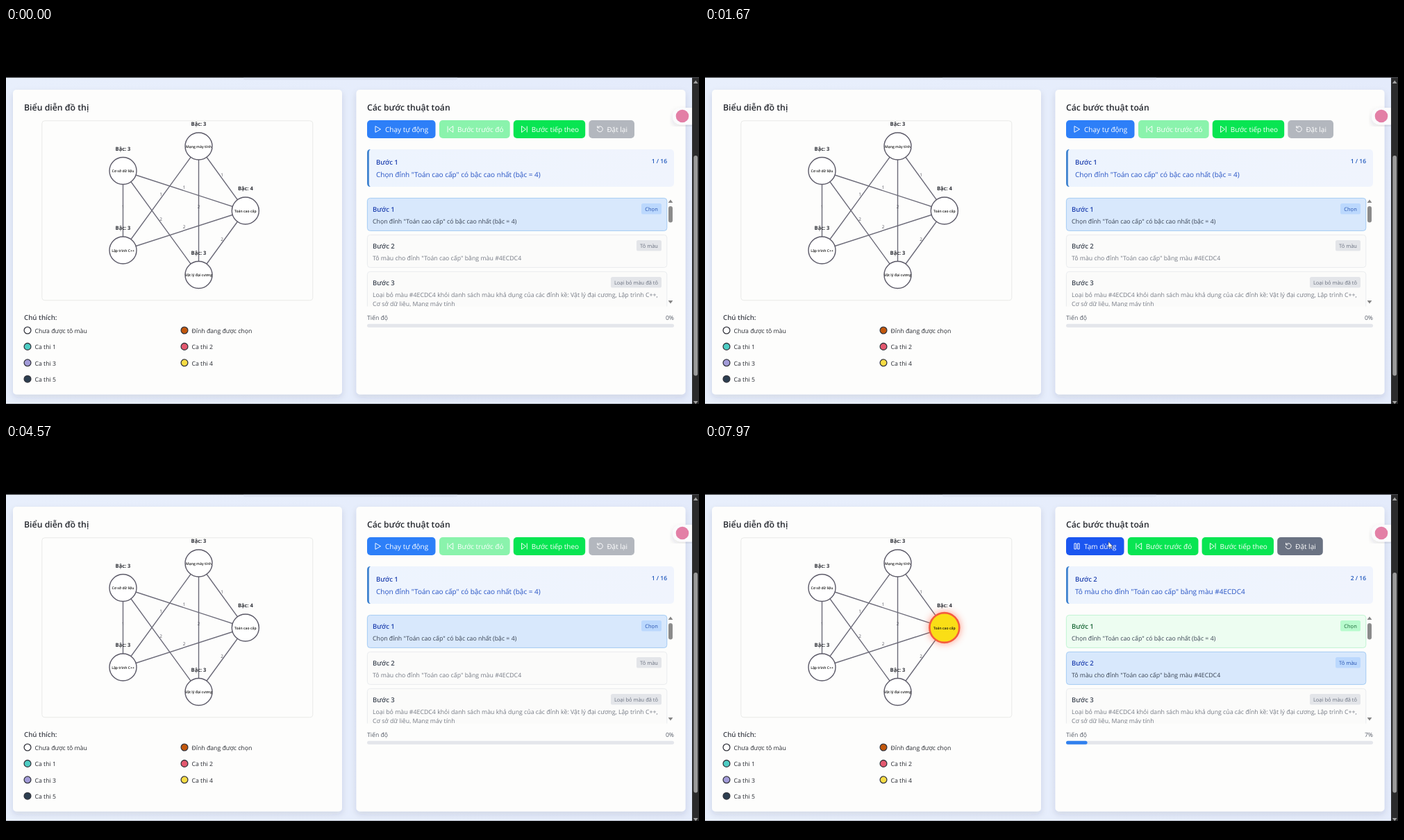
Animation, 998 px wide and 561 px high, one loop 8000 ms. Source, as an HTML page:

```html
<!DOCTYPE html>
<html lang="vi">
<head>
<meta charset="utf-8">
<title>Tô màu đồ thị</title>
<style>
html, body { margin: 0; width: 100%; height: 100%; overflow: hidden; background: #000; }
svg { display: block; width: 100vw; height: 100vh; }
text { font-family: "Open Sans", "Noto Sans", sans-serif; text-rendering: geometricPrecision; white-space: pre; }
</style>
</head>
<body>
<svg id="stage" viewBox="0 0 998 561" preserveAspectRatio="none"></svg>
<script>
const LOOP = 8000, HOVER = 5120, CLICK = 5350, STEP = 7350;

const text = (x, y, str, size, fill, weight = 400, anchor = 'start', id = '') =>
  `<text ${id && `id="${id}"`} x="${x}" y="${y}" font-size="${size}" fill="${fill}" font-weight="${weight}" text-anchor="${anchor}">${str}</text>`;
const rect = (x, y, w, h, r, fill, extra = '') =>
  `<rect x="${x}" y="${y}" width="${w}" height="${h}" rx="${r}" fill="${fill}" ${extra}/>`;
const circle = (x, y, r, fill, extra = '') =>
  `<circle cx="${x}" cy="${y}" r="${r}" fill="${fill}" ${extra}/>`;

// Graph
const nodes = [
  [277.5, 170.5, 'Mạng máy tính', 3],
  [168.5, 206, 'Cơ sở dữ liệu', 3],
  [344.8, 263.5, 'Toán cao cấp', 4],
  [168.5, 320.5, 'Lập trình C++', 3],
  [277.5, 356, 'Vật lý đại cương', 3],
];
const edges = [[0, 2, 1], [1, 2, 1], [0, 3, 1], [0, 4, 2], [1, 4, 2], [3, 2, 2], [4, 2, 2], [1, 3, 1]];

const edgeSvg = ([a, b, w]) => {
  const [x1, y1] = nodes[a], [x2, y2] = nodes[b];
  return `<line x1="${x1}" y1="${y1}" x2="${x2}" y2="${y2}" stroke="#6b6a78" stroke-width="1.4"/>` +
    text((x1 + x2) / 2, (y1 + y2) / 2 - 3.2, w, 6.4, '#55555f', 400, 'middle');
};
const nodeSvg = ([x, y, name, degree], i) =>
  (i === 2 ? `<circle id="glow" cx="${x}" cy="${y}" r="23" fill="#ff5a3c" filter="url(#blur)" opacity="0"/>` : '') +
  circle(x, y, 19.5, '#fff', `id="node${i}" stroke="#5c5a68" stroke-width="1.4"`) +
  text(x, y + 2.1, name, 5.1, '#111', 600, 'middle') +
  text(x, y - 29.3, `Bậc: ${degree}`, 7.5, '#2d2f36', 700, 'middle');

// Legend
const legend = [
  ['Chưa được tô màu', '#fff'], ['Đỉnh đang được chọn', '#c2570c'],
  ['Ca thi 1', '#4ecdc4'], ['Ca thi 2', '#e4586f'],
  ['Ca thi 3', '#a29bd8'], ['Ca thi 4', '#f7dc45'], ['Ca thi 5', '#2c3e50'],
];
const legendSvg = ([name, fill], i) => {
  const x = 31 + 226 * (i % 2), y = 436 + 23.4 * (i >> 1);
  return circle(x, y, 4.9, fill, 'stroke="#33343c" stroke-width="1.3"') + text(x + 10.5, y + 3.7, name, 8.7, '#25282f');
};

// Buttons
const icons = {
  play: 'M.8 -4.2 L8 0 L.8 4.2Z',
  pause: 'M.8 -4 H3 V4 H.8Z M5.4 -4 H7.6 V4 H5.4Z',
  prev: 'M.6 -4 V4 M8 -4.2 L2.4 0 L8 4.2Z',
  next: 'M8 -4 V4 M.6 -4.2 L6.2 0 L.6 4.2Z',
  reset: 'M1.2 -2.6 A4 4 0 1 1 .5 .6 M.9 -4.5 V-2 H3.4',
};
const button = (id, x, w, icon, label) =>
  `<g id="${id}" transform="translate(${x} 0)">${rect(0, 133, w, 26, 5, '#fff')}` +
  `<path d="${icons[icon]}" transform="translate(11.5 146)" fill="none" stroke="#fff" stroke-width=".95" stroke-linejoin="round" stroke-linecap="round"/>` +
  text(26, 149.8, label, 10, '#fff') + '</g>';

// Step list
const looks = {
  idle:   { fill: [251, 251, 250], line: [232, 234, 236], title: '#3d4552', desc: '#767b85', tag: '#e3e5e9', tagText: '#6b7280' },
  active: { fill: [216, 232, 252], line: [156, 200, 242], title: '#1e40af', desc: '#374151', tag: '#bbd8fd', tagText: '#2450b0' },
  done:   { fill: [237, 253, 241], line: [187, 243, 208], title: '#166534', desc: '#374151', tag: '#b7fbcd', tagText: '#166534' },
};
const pick = 'Chọn đỉnh "Toán cao cấp" có bậc cao nhất (bậc = 4)';
const paint = 'Tô màu cho đỉnh "Toán cao cấp" bằng màu #4ECDC4';
const steps = [
  ['Chọn', 29, pick],
  ['Tô màu', 36, paint],
  ['Loại bỏ màu đã tô', 73, 'Loại bỏ màu #4ECDC4 khỏi danh sách màu khả dụng của các đỉnh kề: Vật lý đại cương, Lập trình C++,', 'Cơ sở dữ liệu, Mạng máy tính'],
];
const stepSvg = ([tag, w, line1, line2 = ''], i) => {
  const y = 245 + 53 * i;
  return `<g id="row${i}">` + rect(520.4, y + .4, 431.4, i < 2 ? 47 : 62, 4, '#fff', 'stroke-width=".9"') +
    rect(944 - w, y + 8, w, 15.6, 2.6, '#eee') +
    text(528, y + 20, `Bước ${i + 1}`, 9.5, '#333', 600) +
    text(944 - w / 2, y + 18.6, tag, 7.5, '#333', 400, 'middle') +
    text(528, y + 36.6, line1, 8.77, '#333') + text(528, y + 50, line2, 8.77, '#333') + '</g>';
};

const panel = x => rect(x, 89, 474, 439.5, 5, '#fdfdfc', 'filter="url(#shadow)"');
const stage = document.getElementById('stage');

stage.innerHTML = `
<defs>
  <linearGradient id="page" x2="1"><stop stop-color="#e8effc"/><stop offset="1" stop-color="#e4ebfb"/></linearGradient>
  <linearGradient id="banner" x2="1"><stop stop-color="#edf4fe"/><stop offset="1" stop-color="#f0f4fd"/></linearGradient>
  <filter id="shadow" x="-10%" y="-10%" width="120%" height="120%"><feDropShadow dx="0" dy="4" stdDeviation="4" flood-color="#334" flood-opacity=".13"/></filter>
  <filter id="blur" x="-60%" y="-60%" width="220%" height="220%"><feGaussianBlur stdDeviation="5.5"/></filter>
  <clipPath id="list"><rect x="519" y="244" width="434" height="157.5"/></clipPath>
  <clipPath id="view"><rect y="71.5" width="998" height="470.5"/></clipPath>
</defs>
<rect width="998" height="561"/>
<g clip-path="url(#view)">
  ${rect(0, 71, 998, 472, 0, 'url(#page)')}
  ${rect(342, 70, 308, 5, 2, '#d3d9e9', 'opacity=".45"')}
  ${panel(10)}${panel(504.5)}
  ${text(26, 119, 'Biểu diễn đồ thị', 12.3, '#25282f', 600)}
  ${rect(51.8, 133.8, 390, 259, 4, '#fdfdfc', 'stroke="#e7e8e6" stroke-width=".9"')}
  ${edges.map(edgeSvg).join('')}
  ${nodes.map(nodeSvg).join('')}
  ${text(26, 420.5, 'Chú thích:', 9.75, '#41444d', 600)}
  ${legend.map(legendSvg).join('')}

  ${text(520, 119, 'Các bước thuật toán', 12.2, '#25282f', 600)}
  ${button('play', 520, 98.5, 'play', 'Chạy tự động')}
  ${button('pause', 520, 83.5, 'pause', 'Tạm dừng')}
  ${button('prev', 624, 101.7, 'prev', 'Bước trước đó')}
  ${button('next', 730.8, 103.4, 'next', 'Bước tiếp theo')}
  ${button('reset', 839.4, 65.6, 'reset', 'Đặt lại')}

  ${rect(520, 175, 442, 54, 5, 'url(#banner)')}
  <path d="M525 175 Q520 175 520 180 V224 Q520 229 525 229 Q522.8 228 522.8 224 V180 Q522.8 176 525 175Z" fill="#3f83cf"/>
  ${text(533, 196.8, '', 9.5, '#1e40af', 600, 'start', 'nowTitle')}
  ${text(533, 215, '', 10.02, '#2552c4', 400, 'start', 'nowDesc')}
  ${text(952, 195, '', 8.5, '#2159bd', 600, 'end', 'count')}

  <g clip-path="url(#list)">${steps.map(stepSvg).join('')}</g>
  ${rect(954, 257, 6, 23.5, 3, '#8b8b8b')}
  <path d="M953.6 252 L957 247.6 L960.4 252Z M953.6 393 L957 397.4 L960.4 393Z" fill="#858585"/>

  ${text(520, 421, 'Tiến độ', 8.7, '#565c68')}
  ${text(962, 421, '', 8.7, '#565c68', 400, 'end', 'percent')}
  ${rect(520, 426.8, 442, 5, 2.5, '#e4e6eb')}
  <rect id="bar" x="520" y="426.8" height="5" rx="2.5" fill="#3080ee"/>

  ${rect(960, 115, 40, 24.5, 12, '#fbfbfd', 'filter="url(#shadow)"')}
  ${circle(974, 127, 9.3, '#e37fa6')}
  ${rect(988, 71, 10, 472, 0, '#2b2b2c')}
  ${rect(990.3, 184, 5.8, 317.5, 2.9, '#9b9b9b')}
  <path d="M989.8 80 L993.2 75.4 L996.6 80Z M989.8 538 L993.2 542.4 L996.6 538Z" fill="#a0a0a0"/>
  <path id="cursor" d="M0 0 V8.8 L2.1 7 L3.5 10.2 L4.9 9.6 L3.6 6.5 H6.2Z" fill="#fff" stroke="#222" stroke-width=".5"/>
</g>`;

const $ = id => document.getElementById(id);
const set = (el, attrs) => { for (const k in attrs) el.setAttribute(k, attrs[k]); };
const clamp = v => Math.min(1, Math.max(0, v));
const span = (t, start, ms) => clamp((t - start) / ms);
const mix = (a, b, p) => a + (b - a) * p;
const color = (a, b, p) => `rgb(${a.map((v, i) => Math.round(mix(v, b[i], p)))})`;
const cubic = p => p < .5 ? 4 * p ** 3 : 1 - 4 * (1 - p) ** 3;

// cubic-bezier(.4, 0, .2, 1)
function ease(p) {
  let lo = 0, hi = 1, s = p;
  for (let i = 0; i < 20; i++) {
    s = (lo + hi) / 2;
    const x = 1.2 * s * (1 - s) ** 2 + .6 * s * s * (1 - s) + s ** 3;
    x < p ? lo = s : hi = s;
  }
  return 3 * s * s - 2 * s ** 3;
}

function styleRow(i, from, to, p, snapped) {
  const [box, tag, title, tagText, ...lines] = $('row' + i).children;
  const look = snapped ? to : from;
  set(box, { fill: color(from.fill, to.fill, p), stroke: color(from.line, to.line, p) });
  set(tag, { fill: look.tag });
  set(title, { fill: look.title });
  set(tagText, { fill: look.tagText });
  lines.forEach(l => set(l, { fill: look.desc }));
}

function placeButton(id, x, fill) {
  set($(id), { transform: `translate(${x} 0)` });
  set($(id).firstChild, { fill });
}

function render(t) {
  const running = t >= CLICK, second = t >= STEP;
  const shift = running ? -15.2 : 0;
  const blue = color([45, 127, 248], [27, 86, 240], ease(span(t, HOVER, 150)));

  set($('play'), { display: running ? 'none' : 'inline' });
  set($('pause'), { display: running ? 'inline' : 'none' });
  placeButton('play', 520, blue);
  placeButton('pause', 520, blue);
  placeButton('prev', 624 + shift, second ? '#08e552' : '#8af3ac');
  placeButton('next', 730.8 + shift, '#08e552');
  placeButton('reset', 839.4 + shift, second ? '#6a7282' : '#b3b7be');

  $('nowTitle').textContent = second ? 'Bước 2' : 'Bước 1';
  $('nowDesc').textContent = second ? paint : pick;
  $('count').textContent = second ? '2 / 16' : '1 / 16';
  $('percent').textContent = second ? '7%' : '0%';

  const p = ease(span(t, STEP, 300));
  styleRow(0, looks.active, looks.done, p, second);
  styleRow(1, looks.idle, looks.active, p, second);
  styleRow(2, looks.idle, looks.idle, 0, false);
  set($('bar'), { width: 30.6 * ease(span(t, STEP, 500)) });

  const n = cubic(span(t, STEP + 30, 500));
  set($('node2'), {
    r: mix(19.5, 21.4, n),
    fill: color([255, 255, 255], [250, 222, 22], n),
    stroke: color([92, 90, 104], [244, 92, 62], n),
    'stroke-width': mix(1.4, 2.6, n),
  });
  set($('glow'), { opacity: .6 * n });

  const c = ease(span(t, 4700, 480));
  set($('cursor'), { transform: `translate(${mix(610, 581, c)} ${mix(545, 139.5, c)})` });
}

function frame(now) {
  render(now % LOOP);
  requestAnimationFrame(frame);
}
render(0);
requestAnimationFrame(frame);
</script>
</body>
</html>
```
